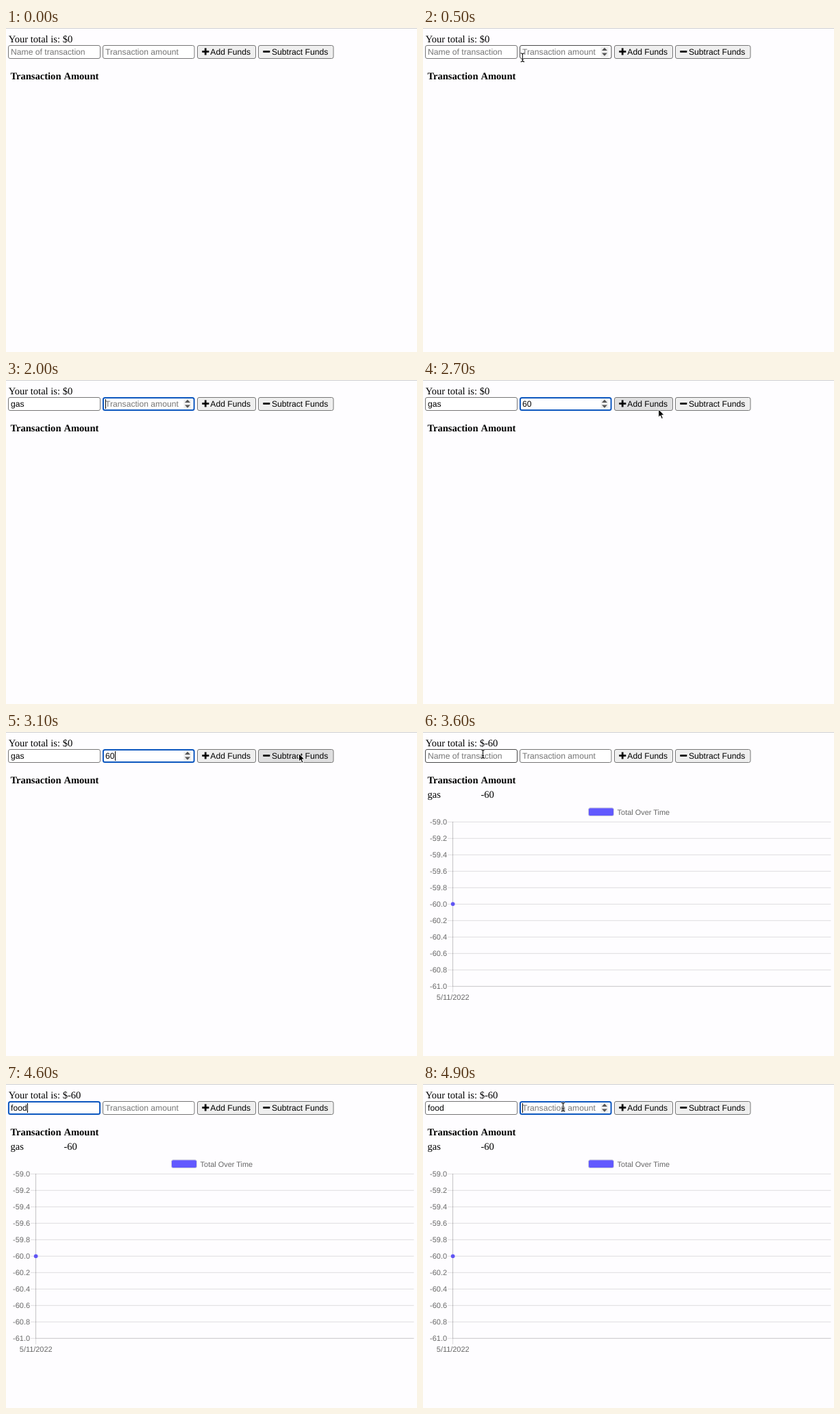
An HTML page with a canvas that plays this animation: 600 px wide and 473 px high, repeating every 5000 ms.

```html
<!DOCTYPE html>
<html lang="en">
<head>
<meta charset="utf-8">
<title>Budget tracker</title>
<style>
  html, body { margin: 0; width: 100%; height: 100%; overflow: hidden; background: #fefdff; }
  canvas { display: block; width: 100vw; height: 100vh; }
</style>
</head>
<body>
<canvas id="stage" width="600" height="473"></canvas>
<script>
const ctx = document.getElementById('stage').getContext('2d');
const LOOP = 5000, STEP = 100;
const SERIF = '14.56px "Liberation Serif", serif';
const SANS = '12.14px "Liberation Sans", sans-serif';
const SMALL = '10.93px "Liberation Sans", sans-serif';

const BOXES = {
  name: { x: 3.5, w: 134 },
  amount: { x: 141.5, w: 133.5 },
  add: { x: 279.5, w: 85 },
  subtract: { x: 368.5, w: 109.5 }
};
const TOP = 25.5, HEIGHT = 19;

// [time, x, y]; null x hides the pointer
const POINTER = [
  [0, null], [200, 215, 93], [400, 165, 44], [700, 106, 41], [800, 106, 41.5],
  [1500, null], [2500, 250, 55], [2800, 390, 36], [3000, 427, 31], [3200, 427, 31],
  [3500, 110, 32], [3600, 87.5, 32], [4300, null],
  [4700, 130, 27], [4800, 180, 27], [4900, 204.5, 33.5], [5000, 204.5, 33.5]
];
const FOCUS = [[0, ''], [700, 'name'], [2000, 'amount'], [3200, ''], [3700, 'name'], [4900, 'amount']];
const NAME = [[0, ''], [1600, 'g'], [1700, 'ga'], [1800, 'gas'], [3200, ''],
  [4300, 'f'], [4400, 'fo'], [4500, 'foo'], [4600, 'food']];
const AMOUNT = [[0, ''], [2100, '6'], [2200, '60'], [3200, '']];
const CARET = [[0, true], [800, false], [1100, true], [1300, false], [1500, true],
  [2600, false], [2900, true], [3900, false], [4200, true]];
const SUBMIT = 3200, CHART_EASE = 500;

const at = (track, t) => track.filter(key => key[0] <= t).pop()[1];

function pointerAt(t) {
  const i = POINTER.findLastIndex(key => key[0] <= t);
  const [t0, x0, y0] = POINTER[i];
  const [t1, x1, y1] = POINTER[i + 1];
  if (x0 === null) return null;
  if (x1 === null) return { x: x0, y: y0 };
  const k = (t - t0) / (t1 - t0);
  return { x: x0 + (x1 - x0) * k, y: y0 + (y1 - y0) * k };
}

function boxUnder(p) {
  if (!p || p.y < TOP || p.y > TOP + HEIGHT) return '';
  return Object.keys(BOXES).find(id => p.x >= BOXES[id].x && p.x <= BOXES[id].x + BOXES[id].w) || '';
}

function text(str, x, y, font, color = '#000', align = 'left') {
  ctx.font = font;
  ctx.fillStyle = color;
  ctx.textAlign = align;
  ctx.fillText(str, x, y);
}

function rect(x, y, w, h, color) {
  ctx.fillStyle = color;
  ctx.fillRect(x, y, w, h);
}

function polygon(points, color) {
  ctx.beginPath();
  points.forEach(([x, y]) => ctx.lineTo(x, y));
  ctx.closePath();
  ctx.fillStyle = color;
  ctx.fill();
}

function frame(x, y, w, h, fill, stroke, width) {
  ctx.beginPath();
  ctx.roundRect(x, y, w, h, 2.5);
  ctx.fillStyle = fill;
  ctx.fill();
  ctx.strokeStyle = stroke;
  ctx.lineWidth = width;
  ctx.stroke();
}

function input(id, value, placeholder, state) {
  const { x, w } = BOXES[id];
  const focused = state.focus === id, hovered = state.hover === id;
  if (focused) frame(x + .4, TOP + .4, w - .8, HEIGHT - .8, '#fff', '#0d57bf', 2);
  else frame(x, TOP, w, HEIGHT, '#fff', hovered ? '#4a4a4a' : '#767676', 1);
  const left = x + 3.6;
  text(value || placeholder, left, 39, SANS, value ? '#000' : '#757575');
  if (focused && state.caret) {
    rect(Math.round(left + ctx.measureText(value).width * (value ? 1 : 0)), 28, 1, 14, '#000');
  }
  if (id === 'amount' && (focused || hovered)) {
    rect(259.5, 27.5, 11, 15, '#efefef');
    polygon([[261, 33], [265, 28.7], [269, 33]], '#555');
    polygon([[261, 36.5], [265, 40.8], [269, 36.5]], '#555');
  }
}

function button(id, label, textX, state) {
  const { x, w } = BOXES[id];
  frame(x, TOP, w, HEIGHT, state.hover === id ? '#dfdfe0' : '#efefef', '#767676', 1);
  rect(x + 6.8, 33.1, 10, 2.7, '#000');
  if (id === 'add') rect(x + 10.4, 29.4, 2.7, 10, '#000');
  text(label, textX, 39, SANS);
}

function chart(elapsed) {
  const left = 43, right = 595.5, top = 131, bottom = 371, gap = 24;
  const grid = 'rgba(0,0,0,.13)', axis = 'rgba(0,0,0,.1)';
  frame(241.5, 110.8, 37, 11.8, '#6259ff', '#d4d4dc', 1);
  text('Total Over Time', 283.6, 120.5, SMALL, '#666');
  for (let i = 0; i <= 10; i++) {
    const y = top + i * gap;
    rect(36, y - .2, right - 36, 1, grid);
    text((-59 - i * .2).toFixed(1), 35, y + 4, SMALL, '#666', 'right');
  }
  rect(left, top, 1, bottom - top + 9, grid);
  rect(left, top, 1, bottom - top, axis);
  rect(left, bottom - .2, right - left, 1, axis);
  text('5/11/2022', 43.7, 390.7, SMALL, '#666', 'center');

  const k = Math.min(elapsed / CHART_EASE, 1);
  ctx.beginPath();
  ctx.arc(43.6, top + 120.3 * (1 - (1 - k) ** 4), 2.9, 0, 7);
  ctx.fillStyle = '#6055f4';
  ctx.fill();
}

function pointer(p, hover) {
  ctx.save();
  ctx.translate(p.x, p.y);
  ctx.lineJoin = 'round';
  if (hover === 'name' || hover === 'amount') {
    ctx.beginPath();
    for (const s of [-1, 1]) {
      ctx.moveTo(-2.8, 6.3 * s);
      ctx.quadraticCurveTo(0, 6.3 * s, 0, 4 * s);
      ctx.quadraticCurveTo(0, 6.3 * s, 2.8, 6.3 * s);
    }
    ctx.moveTo(0, -5);
    ctx.lineTo(0, 5);
    ctx.moveTo(-1.5, 2.5);
    ctx.lineTo(1.5, 2.5);
    for (const [color, width] of [['rgba(255,255,255,.8)', 2.4], ['#111', 1.1]]) {
      ctx.strokeStyle = color;
      ctx.lineWidth = width;
      ctx.stroke();
    }
  } else {
    polygon([[.5, .5], [.5, 12], [3.1, 9.6], [5, 14.2], [7, 13.3], [5.1, 8.9], [8.6, 8.7]], '#000');
    ctx.strokeStyle = '#fff';
    ctx.lineWidth = .9;
    ctx.stroke();
  }
  ctx.restore();
}

function draw(t) {
  const done = t >= SUBMIT;
  const mouse = pointerAt(t);
  const state = { focus: at(FOCUS, t), caret: at(CARET, t), hover: boxUnder(mouse) };

  rect(0, 0, 600, 473, '#fefdff');
  rect(0, 0, 600, 1, '#cfcfd2');
  text('Your total is: $' + (done ? '-60' : '0'), 3.7, 21.3, SERIF);
  input('name', at(NAME, t), 'Name of transaction', state);
  input('amount', at(AMOUNT, t), 'Transaction amount', state);
  button('add', 'Add Funds', 298.3, state);
  button('subtract', 'Subtract Funds', 388, state);
  text('Transaction', 6.4, 75.3, 'bold ' + SERIF);
  text('Amount', 84.4, 75.3, 'bold ' + SERIF);
  if (done) {
    text('gas', 6.4, 96, SERIF);
    text('-60', 84.4, 96, SERIF);
    chart(t - SUBMIT);
  }
  if (mouse) pointer(mouse, state.hover);
}

ctx.textRendering = 'geometricPrecision';
const start = performance.now();
function tick() {
  const t = (performance.now() - start) % LOOP;
  draw(Math.floor(t / STEP) * STEP);
  requestAnimationFrame(tick);
}
tick();
</script>
</body>
</html>
```
